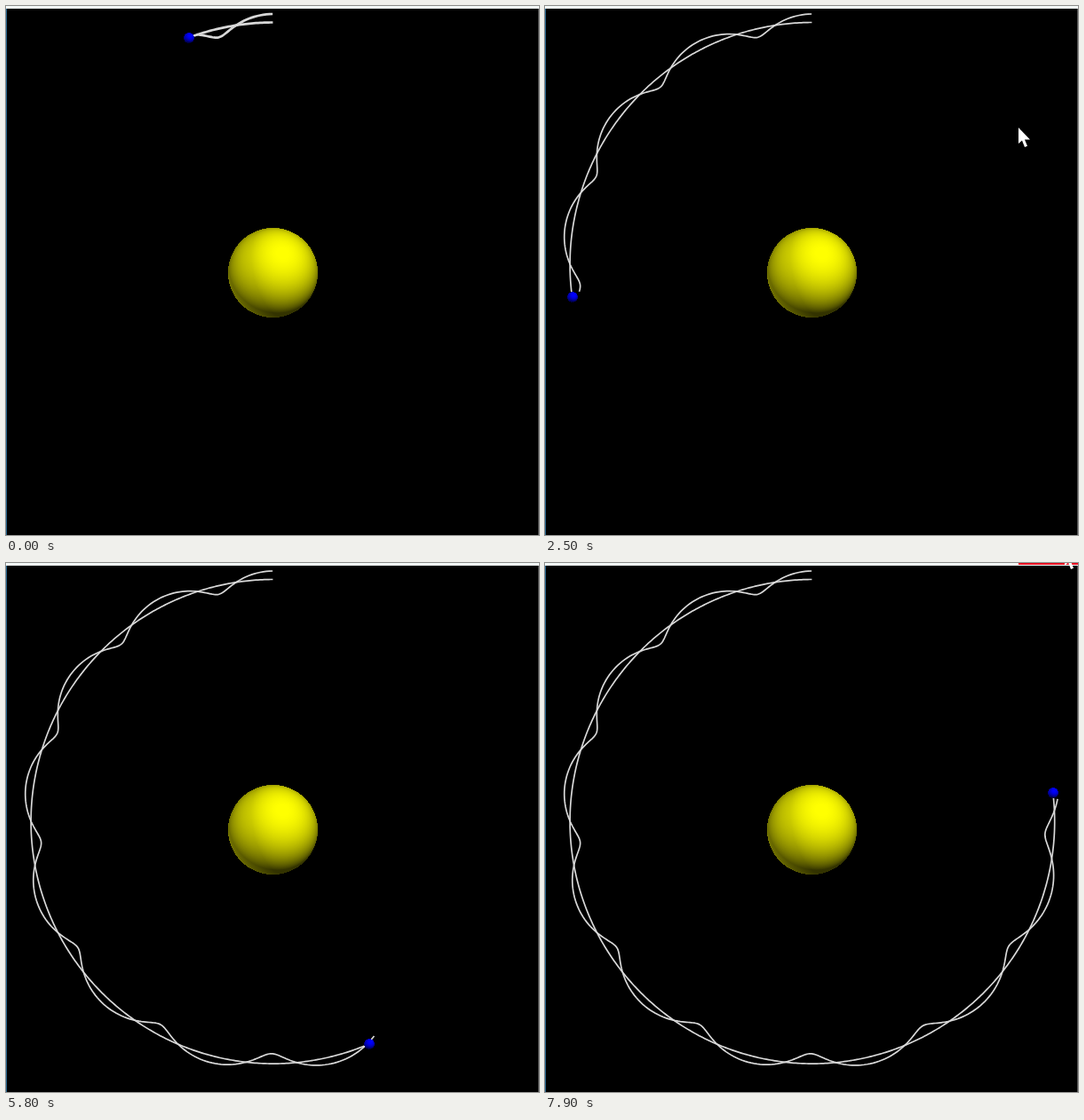
Recreate the animation shown at these times as an HTML page with a canvas. Size 600 by 596 pixels, loop 8 s.

```html
<!DOCTYPE html>
<html lang="en">
<head>
<meta charset="utf-8">
<title>Orbits</title>
<style>
  html, body { margin: 0; height: 100%; overflow: hidden; background: #000; }
  canvas { display: block; }
</style>
</head>
<body>
<canvas id="stage" width="600" height="596"></canvas>
<script>
const ctx = document.getElementById('stage').getContext('2d');
const LOOP = 8000, STEP = 100, TAU = Math.PI * 2, RAD = Math.PI / 180;
const CENTER = { x: 300.9, y: 291.3 }, ORBIT = 272.8;

// The simulation runs unevenly: [time in ms, planet angle in degrees from the top]
const pace = [
  [0, 20.4], [1400, 53.6], [2500, 97.8], [3500, 118.2], [3800, 134.7],
  [4000, 134.7], [4400, 145], [5000, 176.2], [6500, 227.1], [7900, 276.9]
];

const progress = (t, start, end) => Math.min(1, Math.max(0, (t - start) / (end - start)));

function planetAngle(t) {
  const i = Math.max(1, pace.findIndex(([time]) => time >= t));
  const [t0, a0] = pace[i - 1], [t1, a1] = pace[i];
  return a0 + (a1 - a0) * progress(t, t0, t1);
}

// Point at an orbit angle, moved outward and ahead along the orbit.
function orbitPoint(deg, out = 0, ahead = 0) {
  const s = Math.sin(deg * RAD), c = Math.cos(deg * RAD), r = ORBIT + out;
  return [CENTER.x - r * s - ahead * c, CENTER.y - r * c + ahead * s];
}

const planetAt = deg => orbitPoint(deg);

// The moon circles the planet; its distance and period drift slowly.
function moonAt(deg) {
  const u = deg - 13.5;
  const phase = TAU * ((u + 3.1 * Math.sin(0.75 * u * RAD)) / 28.1 + 0.5);
  const drift = 0.9 * (1 - Math.cos(deg * RAD));
  return orbitPoint(deg, 9.5 * Math.cos(phase) - drift, 9.5 * Math.sin(phase));
}

function trail(position, end, width) {
  ctx.beginPath();
  for (let d = 0.1; d < end; d += 0.5) ctx.lineTo(...position(d));
  ctx.lineTo(...position(end));
  ctx.lineWidth = width;
  ctx.strokeStyle = '#d8d8d8';
  ctx.stroke();
}

// Hard-edged sphere with ambient light, a key light and a fill light from behind.
function makeBall(radius, color) {
  const size = Math.ceil(radius * 2), canvas = document.createElement('canvas');
  canvas.width = canvas.height = size;
  const pen = canvas.getContext('2d');
  for (let py = 0; py < size; py++) {
    for (let px = 0; px < size; px++) {
      const x = (px + 0.5 - size / 2) / radius, y = (py + 0.5 - size / 2) / radius;
      if (x * x + y * y > 1) continue;
      const z = Math.sqrt(1 - x * x - y * y);
      const key = Math.max(0, 0.22 * x - 0.44 * y + 0.88 * z);
      const fill = Math.max(0, -0.88 * x + 0.22 * y - 0.44 * z);
      const level = 0.2 + 0.8 * key + 0.3 * fill;
      pen.fillStyle = `rgb(${color.map(c => Math.min(255, c * level))})`;
      pen.fillRect(px, py, 1, 1);
    }
  }
  return canvas;
}

const sun = makeBall(50.5, [255, 255, 0]);
const planet = makeBall(6, [0, 0, 255]);

function place(ball, x, y) {
  ctx.drawImage(ball, Math.round(x - ball.width / 2), Math.round(y - ball.height / 2));
}

function rect(color, x, y, w, h) {
  ctx.fillStyle = color;
  ctx.fillRect(x, y, w, h);
}

function pointer(t) {
  const enter = progress(t, 900, 1200), leave = progress(t, 4400, 4800), back = progress(t, 7500, 7700);
  ctx.save();
  ctx.translate(530 + 3 * enter + 50 * leave + 2 * back, 263 - 126 * enter - 167 * leave + 15 * back);
  ctx.fillStyle = '#fff';
  ctx.fill(new Path2D('M0 0V18L4 14.5L7 22L10 20.7L7 13.5H13Z'));
  ctx.restore();
}

function draw(t) {
  rect('#000', 0, 0, 600, 596);
  const angle = planetAngle(t), width = Math.max(1.7, 2.7 - t / 2500);
  place(sun, 300.5, 300.5);
  trail(planetAt, angle, width);
  trail(moonAt, angle, width);
  place(planet, ...planetAt(angle));

  rect('#f4fcfa', 0, 0, 600, 3);
  rect('#2b6a94', 0, 3, 1, 593);
  rect('#555', 599, 3, 1, 593);
  if (t >= 7700) rect('#e81123', 533, 0, 67, 2);
  if (t >= 900) pointer(t);
}

function tick() {
  const t = performance.now() % LOOP;
  draw(Math.floor(t / STEP) * STEP);
  requestAnimationFrame(tick);
}
tick();
</script>
</body>
</html>
```
